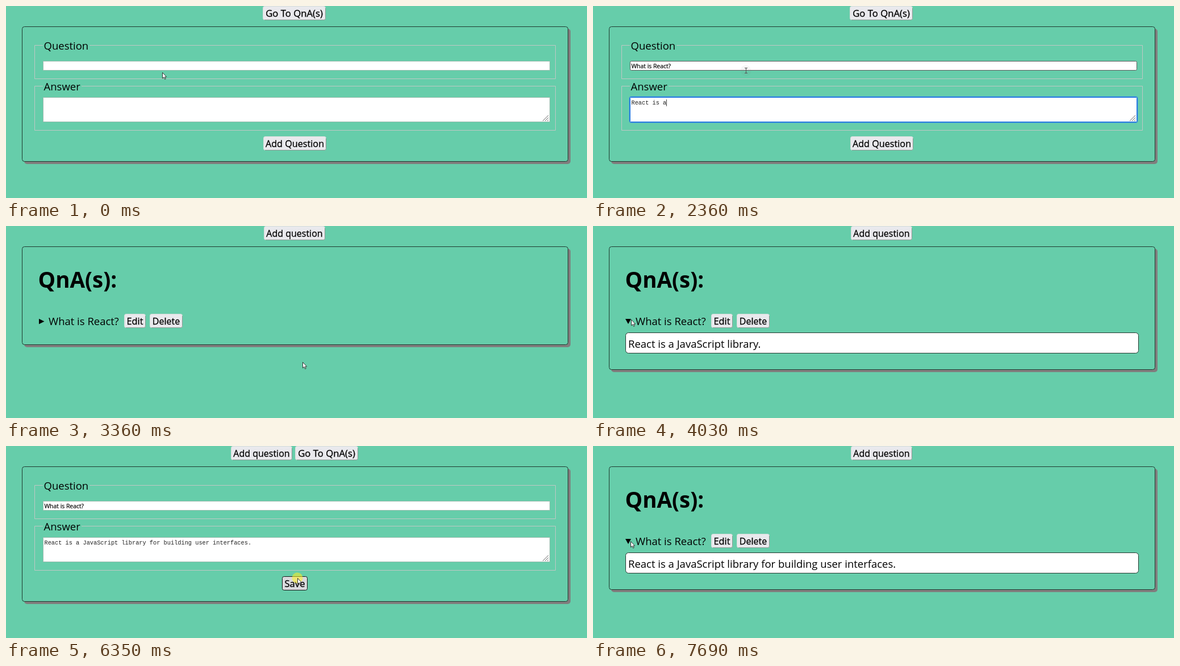
Write an HTML page that moves like this. It is 1023 px wide and 339 px high and loops after 8 s.

```html
<!DOCTYPE html>
<html lang="en">
<head>
<meta charset="utf-8">
<title>QnA</title>
<style>
  html, body { margin: 0; width: 100%; height: 100%; overflow: hidden; background: #66cdaa; }
  svg { display: block; width: 100%; height: 100%; }
  text { font-family: "Open Sans", "Noto Sans", sans-serif; font-size: 18.5px; white-space: pre; }
  .title { font-size: 38.5px; font-weight: 700; }
  .button { font-size: 16.2px; text-anchor: middle; stroke: #000; stroke-width: .3; }
  .input { font-size: 10.4px; stroke: #000; stroke-width: .2; }
  .area { font-family: "Liberation Mono", "DejaVu Sans Mono", monospace; font-size: 10.3px; fill: #222; }
</style>
</head>
<body>
<svg id="stage" viewBox="0 0 1023 339" preserveAspectRatio="none"></svg>
<script>
const LOOP = 8000;
const QUESTION = 'What is React?';
const SHORT = 'React is a JavaScript library.';
const LONG = 'React is a JavaScript library for building user interfaces.';

// Each step changes only the listed parts of the state.
const STEPS = [
  [0, { view: 'add', q: '', a: '', focus: '', hover: '', open: false, answer: SHORT, pointer: 'arrow', at: [275, 117], halo: '' }],
  [360, { hover: 'question', pointer: 'beam', at: [269, 114] }],
  [710, { focus: 'question', q: 'What ', halo: 'faded' }],
  [1040, { q: 'What is ' }],
  [1370, { q: QUESTION }],
  [1700, { focus: 'answer' }],
  [2030, { a: 'React is ' }],
  [2360, { a: 'React is a' }],
  [2690, { a: SHORT, hover: 'submit', pointer: 'arrow', at: [522, 240], halo: '' }],
  [3020, { focus: 'submit', halo: 'click' }],
  [3360, { view: 'list', focus: '', hover: '', halo: '' }],
  [3690, { at: [67, 165], halo: 'click' }],
  [4030, { open: true, halo: '' }],
  [4370, { hover: 'edit', at: [229, 171] }],
  [4700, { focus: 'edit', halo: 'click' }],
  [5030, { view: 'edit', focus: 'answer', hover: '', pointer: 'beam', at: [311, 173] }],
  [5360, { a: LONG.slice(0, 42), halo: '' }],
  [6010, { a: LONG, pointer: 'arrow', at: [501, 226] }],
  [6350, { focus: 'submit', hover: 'submit', at: [513, 233], halo: 'click' }],
  [6680, { view: 'list', focus: '', hover: '', open: false, answer: LONG, halo: '' }],
  [7020, { at: [66, 168] }],
  [7350, { halo: 'click' }],
  [7690, { open: true, halo: '' }]
];

const HALOS = { click: ['#fff020', .55], faded: ['#808080', .07] };
const stage = document.getElementById('stage');

// Boxes take whole pixels; the half keeps one-pixel lines sharp.
const box = (x, y, w, h, fill, stroke, r = 0, width = 1) =>
  `<rect x="${x + .5}" y="${y + .5}" width="${w}" height="${h}" rx="${r}" fill="${fill}" stroke="${stroke}" stroke-width="${width}"/>`;
const path = (d, stroke, fill = 'none', width = 1) =>
  `<path d="${d}" fill="${fill}" stroke="${stroke}" stroke-width="${width}"/>`;
const label = (x, y, words, cls = '', size = '') =>
  `<text x="${x}" y="${y}" class="${cls}"${size && ` style="font-size:${size}px"`}>${words}</text>`;

function button(x, y, w, words, size = 16.2, hover = false, focus = false) {
  const shade = path(`M${x + 3} ${y + 24.5}h${w - 5}q2.5 0 2.5 -3v-18`, '#8d9893');
  return box(x, y, w, 24, hover ? '#dadadd' : '#e9e9ed', focus ? '#151515' : '#d3dcd8', 3)
    + (focus ? '' : shade)
    + label(x + w / 2 + .5, y + 19, words, 'button', size);
}

const addLink = x => button(x, 0, 107, 'Add question', 16);
const qnaLink = x => button(x, 0, 110, 'Go To QnA(s)', 16.7);

function panel(bottom) {
  return `<rect x="32" y="40" width="962" height="${bottom - 35}" rx="5" fill="#807d7d"/>`
    + box(28, 36, 961, bottom - 36, '#66cdaa', '#1f3a30', 4);
}

function fieldset(top, bottom, legend, gapEnd) {
  return path(`M65 ${top + .5}H50.5V${bottom + .5}H967.5V${top + .5}H${gapEnd}`, '#c0c8c4')
    + label(66.5, top + 8, legend);
}

function field(y, h, hover, focus) {
  if (!focus) return box(65, y, 892, h, '#fff', hover ? '#5c5c5c' : '#9dbdb0', hover ? 2 : 0);
  return box(64, y - 1, 894, h + 2, '#fff', '#58b4c6', 3, 3)
    + box(64, y - 1, 894, h + 2, 'none', '#2a7de0', 2)
    + box(65, y, 892, h, '#fff', '#2a7de0', 1);
}

function form(s) {
  const editing = s.view === 'edit';
  const submit = [s.hover === 'submit', s.focus === 'submit'];
  return (editing ? addLink(396) + qnaLink(509) : qnaLink(452))
    + panel(274)
    + fieldset(69, 128, 'Question', 147)
    + field(97, 16, s.hover === 'question', s.focus === 'question')
    + label(67.5, 110, s.q, 'input question')
    + fieldset(141, 219, 'Answer', 133)
    + field(161, 43, false, s.focus === 'answer')
    + label(67.5, 174, s.a, 'area answer')
    + path('M945 203L955 193M949 203L955 197M953 203L955 201', '#666')
    + (editing ? button(486, 230, 44, 'Save', 16.6, ...submit)
               : button(453, 230, 110, 'Add Question', 16.2, ...submit));
}

function list(s) {
  const marker = s.open ? 'M57 164H67L62 173Z' : 'M58 163.7V173.3L67.5 168.5Z';
  return addLink(454)
    + panel(s.open ? 253 : 209)
    + label(56.5, 109, 'QnA(s):', 'title')
    + path(marker, 'none', '#000')
    + label(75, 175, QUESTION)
    + button(208, 155, 37, 'Edit', 16.3, s.hover === 'edit', s.focus === 'edit')
    + button(253, 155, 57, 'Delete', 16)
    + (s.open ? box(57, 188, 903, 36, '#fff', '#24382f', 5) + label(62, 215, s.answer) : '');
}

function pointer(s) {
  const [x, y] = s.at;
  const [color, opacity] = HALOS[s.halo] || [];
  const halo = color ? `<circle cx="${x}" cy="${y}" r="9.5" fill="${color}" opacity="${opacity}"/>` : '';
  return halo + (s.pointer === 'beam'
    ? path(`M${x - 2} ${y - 4.5}h5M${x + .5} ${y - 4.5}v9M${x - 2} ${y + 4.5}h5`, '#555')
    : path(`M${x + .5} ${y + .5}v10.3l2.4-2.2 1.7 3.7 1.6-.7-1.6-3.5h3Z`, '#222', '#fff', .9));
}

function draw(s) {
  stage.innerHTML = s.view === 'list' ? list(s) : form(s);
  const target = stage.querySelector('.' + (s.focus || 'none'));
  let caret = '';
  if (target) {
    const x = Math.round(67.5 + (target.textContent ? target.getComputedTextLength() : 0)) + .5;
    const y = s.focus === 'answer' ? 165 : 100;
    caret = path(`M${x} ${y}v12`, '#444');
  }
  stage.insertAdjacentHTML('beforeend', caret + pointer(s));
}

const states = [];
STEPS.forEach(([, change], i) => states.push({ ...states[i - 1], ...change }));

let shown = -1;
function tick() {
  const time = performance.now() % LOOP;
  const index = STEPS.filter(([start]) => start <= time).length - 1;
  if (index !== shown) draw(states[shown = index]);
  requestAnimationFrame(tick);
}
tick();
</script>
</body>
</html>
```
